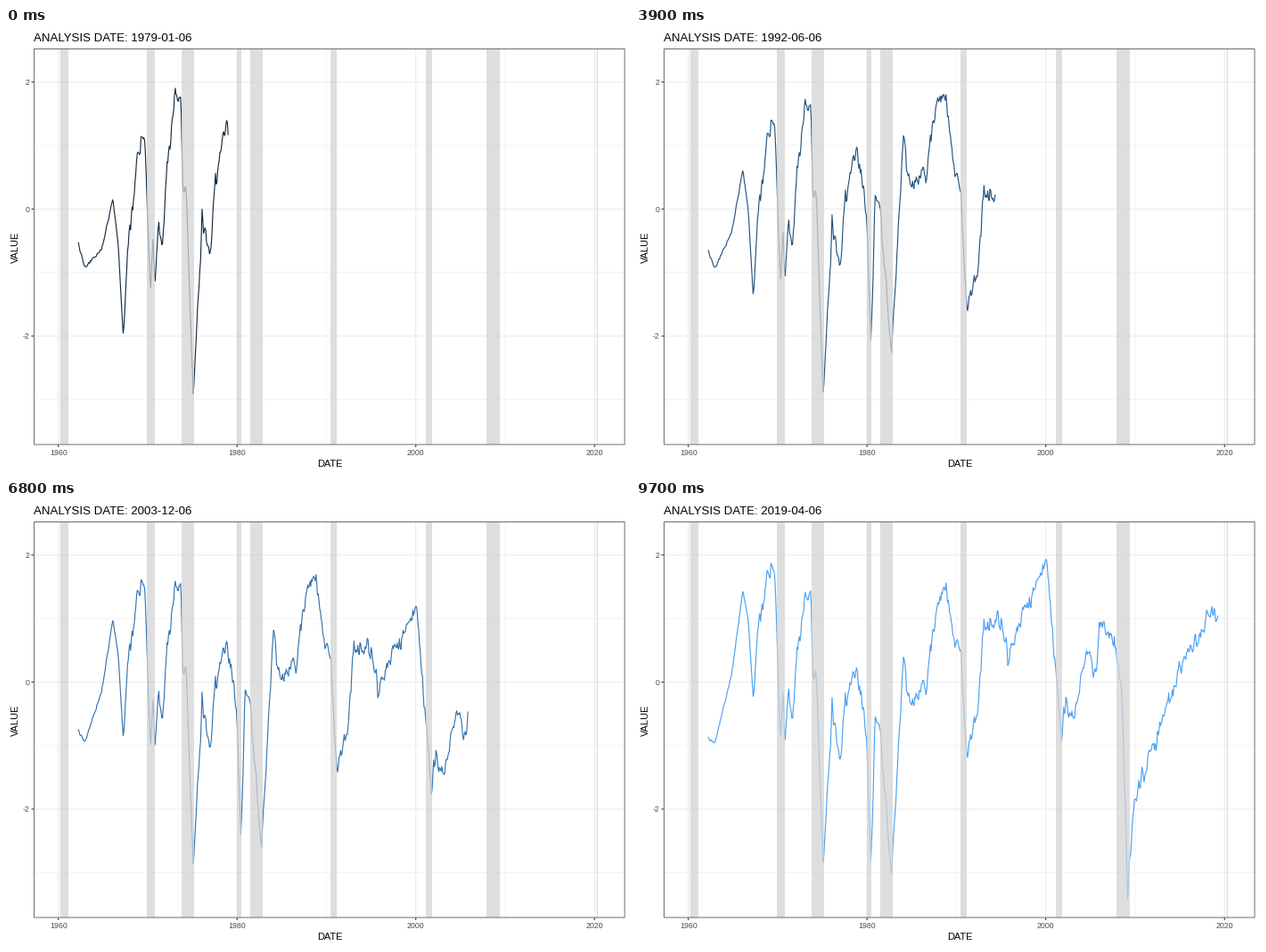
Recreate the animation shown at these times as a matplotlib script. Size 700 px wide and 500 px high, loop 10000 ms.

```python
import numpy as np
import matplotlib.pyplot as plt
from matplotlib.animation import FuncAnimation
from matplotlib.patches import Rectangle

W, H, DPI = 700, 500, 100
PX = 72 / DPI  # points per pixel
LEFT, RIGHT, TOP, BOTTOM = 31.5, 694, 23.5, 468
FIRST_MONTH = 1962 * 12 + 3
FIRST_RELEASE = 1979 * 12
STEP, RELEASES = 23, 22
LAST = RELEASES - 1

plt.rcParams["font.family"] = "Liberation Sans"

# Main peaks and troughs of the latest release, in stage pixels.
CYCLE = [
    (81, 266), (88, 273), (107, 197), (120, 100), (126, 135), (131.5, 220),
    (137, 140), (148, 88), (152, 67), (156, 98), (162, 262), (165, 213),
    (167, 266), (171, 212), (175.5, 246), (181, 165), (190, 99), (197, 120),
    (198, 195), (202, 190), (210, 410), (220, 235), (230, 290), (233, 235),
    (247, 185), (259, 268), (263.5, 405), (268, 250), (273, 250), (286.5, 418),
    (300, 172), (307, 230), (326, 200), (337, 122), (348, 97), (357, 158),
    (364, 165), (371, 281), (384, 235), (389, 148), (410, 138), (417, 178),
    (434, 126), (461, 74), (477.5, 265), (480, 228), (492, 245), (505, 165),
    (517, 190), (520, 135), (538, 165), (545, 215), (551.5, 437), (559, 335),
    (610, 190), (642, 132), (653, 124),
]
# Shift that a release at the very start would show; it fades with time.
REVISION = [(81, -25), (131, 125), (148, 60), (190, -35), (210, 5), (230, -40),
            (248, -85), (300, -85), (337, -60), (371, 45), (441, 130),
            (517, 200), (552, 100)]
# Shift of the calm releases around mid 2013.
CALM = [(81, -10), (131, -20), (152, 40), (200, 0), (236, -90), (275, -30),
        (348, 40), (462, 8), (490, -25), (520, -3), (560, -40), (653, 0)]


def year_x(year):
    return 58.7 + 10.025 * (year - 1960)


def value_y(value):
    return 203.4 - 71.35 * value


def month_count(release):
    return FIRST_RELEASE - FIRST_MONTH + 1 + STEP * release


xs = year_x((FIRST_MONTH + np.arange(month_count(LAST))) / 12)


def trace(points):
    return np.interp(xs, *zip(*points))


def make_noise():
    white = np.random.default_rng(4).normal(0, 5, len(xs))
    noise = np.convolve(white, [0.3, 1, 0.3], mode="same")
    return noise * np.where(xs < 132, 0.2, 1)


cycle, revision, calm, noise = trace(CYCLE), trace(REVISION), trace(CALM), make_noise()


def curve_at(pos):
    """Heights of the series for a fractional release number."""
    age = 1 - pos / LAST
    calmness = np.interp(pos, (13.5, 18, 21), (0, 1, 0))
    return (cycle + age * revision + calmness * calm
            + (1 - 0.65 * calmness) * noise)


STOPS = np.array([(19, 43, 67), (42, 97, 151), (74, 160, 242)]) / 255


def line_color(pos):
    return [np.interp(pos / LAST, (0, 0.5, 1), stop) for stop in STOPS.T]


def change_frame(k):
    return 5 * k - 1 if k <= 13 else 64 + 4 * (k - 13)


def release_at(frame):
    """Return title release, drawn release and blend position."""
    k = sum(change_frame(j) <= frame for j in range(1, RELEASES))
    if k and change_frame(k) == frame:
        return k - 1, k, k - 0.5
    return k, k, k


fig = plt.figure(figsize=(W / DPI, H / DPI), dpi=DPI, facecolor="white")
ax = fig.add_axes([0, 0, 1, 1])
ax.set_xlim(0, W)
ax.set_ylim(H, 0)
ax.axis("off")


def rule(x, y, color, width):
    ax.plot(x, y, color=color, lw=width * PX, zorder=1, snap=False,
            solid_capstyle="butt")


def label(x, y, text, size, color="black", **kw):
    return ax.text(x, y, text, fontsize=size * PX, color=color,
                   va="baseline", **kw)


def draw_grid():
    for year in range(1960, 2021, 10):
        x, major = year_x(year), year % 20 == 0
        rule([x, x], [TOP, BOTTOM], "#EBEBEB", 1.07 if major else 0.53)
        if major:
            rule([x, x], [BOTTOM, BOTTOM + 3], "#333333", 1.07)
            label(x, 480, str(year), 8.8, "#4D4D4D", ha="center")
    for value in range(-3, 3):
        y, major = value_y(value), value % 2 == 0
        rule([LEFT, RIGHT], [y, y], "#EBEBEB", 1.07 if major else 0.53)
        if major:
            rule([LEFT - 3, LEFT], [y, y], "#333333", 1.07)
            label(26.5, y + 3.2, str(value), 8.8, "#4D4D4D", ha="right")


def draw_recessions():
    spans = [(60.6, 70), (158, 167), (197, 211), (259, 264), (274, 288),
             (364, 371), (471, 478), (539, 554), (662.6, 664)]
    for a, b in spans:
        ax.add_patch(Rectangle((a, TOP), b - a, BOTTOM - TOP, lw=0, zorder=4,
                               color="#D3D3D3", alpha=0.75, snap=False))


draw_grid()
draw_recessions()
ax.add_patch(Rectangle((LEFT, TOP), RIGHT - LEFT, BOTTOM - TOP, fill=False,
                       ec="#6E6E6E", lw=PX, zorder=5, snap=False))
label(363, 493, "DATE", 11, ha="center")
label(13.5, 246, "VALUE", 11, ha="center", rotation=90, rotation_mode="anchor")
title = label(31, 15, "", 13.3)
line, = ax.plot([], [], lw=1.15 * PX, zorder=3, solid_joinstyle="round")


def update(frame):
    named, drawn, pos = release_at(frame)
    month = FIRST_RELEASE + STEP * named
    title.set_text(f"ANALYSIS DATE: {month // 12}-{month % 12 + 1:02d}-06")
    n = month_count(drawn)
    line.set_data(xs[:n], curve_at(pos)[:n])
    line.set_color(line_color(pos))
    return line, title


anim = FuncAnimation(fig, update, frames=100, interval=100, repeat=True,
                     repeat_delay=0)
plt.show()
```
